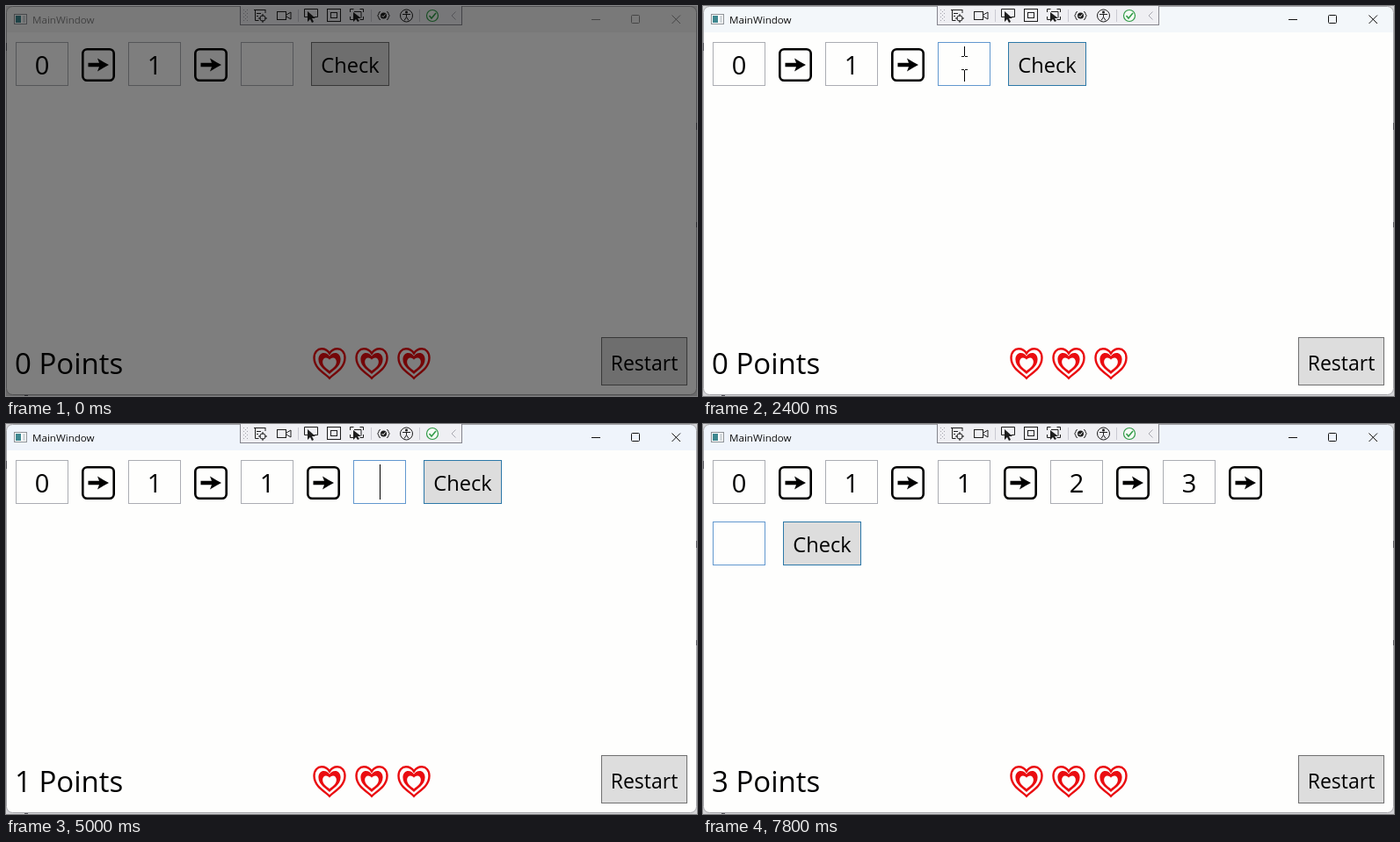
These frames come from a looping animation (786 px wide and 444 px high, 8000 ms). An HTML page:

```html
<!DOCTYPE html>
<html lang="en">
<head>
<meta charset="utf-8">
<title>Number sequence</title>
<style>
  html, body { margin: 0; width: 100%; height: 100%; overflow: hidden; background: #fefefd; }
  svg { display: block; width: 786px; height: 444px; font-family: "Open Sans", "Noto Sans", sans-serif; isolation: isolate; }
  text { fill: #000; }
  .mid { text-anchor: middle; }
  .line { fill: none; stroke: #1e1e1e; }
  .box { fill: #fefefd; stroke: #abadb3; }
  .focus { stroke: #6298cf; }
  .button { fill: #ddd; stroke: #707070; }
  .default { stroke: #2c78a8; }
  .chrome { fill: none; stroke: #8c8c8c; }
  #title { fill: #858585; font-size: 11.6px; }
  #bar { fill: #f3f3f4; }
  .active #bar { fill: #eff4fb; }
  .active #title { fill: #111; }
  .active .chrome { stroke: #111; }
  #ibeam { mix-blend-mode: difference; fill: #fff; }
</style>
</head>
<body>
<svg id="stage" viewBox="0 0 786 444">
  <defs>
    <path id="heartShape" d="M0 16.7C-4 12-17.5 6-17.5-6.5C-17.5-13-13.5-16.7-9-16.7C-5-16.7-2-14.7 0-11.5C2-14.7 5-16.7 9-16.7C13.5-16.7 17.5-13 17.5-6.5C17.5 6 4 12 0 16.7Z"/>
    <g id="heart">
      <use href="#heartShape" fill="#fefefd" stroke="#ea0c10" stroke-width="2.4"/>
      <use href="#heartShape" fill="#ea0c10" transform="scale(.72)"/>
      <use href="#heartShape" fill="#fefefd" transform="translate(0 1) scale(.45)"/>
    </g>
    <g id="arrow">
      <rect x="-17.7" y="-17.7" width="35.4" height="35.4" rx="5" fill="none" stroke="#000" stroke-width="2.6"/>
      <path d="M-11.5-2.2H1L-1-7.5Q6-3 12 0Q6 3-1 7.5L1 2.2H-11.5Z"/>
    </g>
  </defs>

  <rect width="786" height="444" fill="#d3d3d6"/>
  <rect x=".5" y=".5" width="785" height="442" rx="7" fill="#fefefd"/>
  <path id="bar" d="M1 30V8Q1 1 8 1H778Q785 1 785 8V30Z"/>
  <rect x=".5" y=".5" width="785" height="442" rx="7" fill="none" stroke="#a3a3a7"/>
  <path d="M.5 42v9M785.5 133v8M785.5 246v6M21 443.5h4" stroke="#55555c"/>

  <rect x="9.5" y="9.5" width="14" height="11" fill="#fff" stroke="#8d9297"/>
  <path d="M11 11h6v8h-6z" fill="#3f8890"/>
  <path d="M19 11h3v8h-3z" fill="#d4d9dc"/>
  <text id="title" x="30" y="19.7">MainWindow</text>
  <path class="chrome" d="M666 15.5h10M757.5 10.5l9.5 9.5m0-9.5l-9.5 9.5"/>
  <rect class="chrome" x="711.5" y="10.5" width="9" height="9" rx="1"/>

  <g id="tools">
    <rect x="266.5" y="-1" width="252" height="22.5" fill="#efeff3" stroke="#85858d"/>
    <path d="M270.5 4v15M274.5 4v15" stroke="#a5a5ad" stroke-dasharray="1 3"/>
    <path d="M272.5 6v12" stroke="#a5a5ad" stroke-dasharray="1 3"/>
    <path d="M332.5 4v14M415.5 4v14M470.5 4v14" stroke="#cacad2"/>
    <g class="line">
      <path d="M282 4.5h13M283.5 4v12.5h4M295 4v4M285 8.5h5M285 11.5h2" />
      <circle cx="292" cy="14" r="3.2"/>
      <path d="M292 9v3m0 4v3m-5-5h3m4 0h3"/>
      <rect x="308.5" y="6.5" width="10" height="9"/>
      <path d="M319 10l5-3v8l-5-3"/>
      <path d="M343 12.5h-3.5v-9h15v9h-4"/>
      <rect x="365.5" y="3.500" width="15" height="14"/>
      <rect x="369.500" y="7.500" width="7" height="6"/>
      <path d="M391.500 7v-3.500h4m7 0h4V7m0 5v3.500h-4m-7 0h-4V12M396 6.500h8v7"/>
      <path d="M426 6.500q-2 0-2 2t-1.500 2.500q1.500.5 1.500 2.500t2 2M433 6.500q2 0 2 2t1.500 2.500q-1.500.5-1.500 2.500t-2 2"/>
      <circle cx="455.500" cy="11" r="7"/>
      <path d="M451 9.500h9m-4.500 0v3l-2.500 4m2.500-4l2.500 4"/>
    </g>
    <g fill="#1e1e1e">
      <path d="M343 6v12l3-3 2 4 2-1-2-4h4z"/>
      <path d="M395 7v11l3-3 2 3 2-1-2-3h4z"/>
      <circle cx="429.500" cy="11" r="3.500"/>
      <circle cx="455.500" cy="7" r="1.500"/>
    </g>
    <path d="M427.500 11l1.500 1.500 2.500-3" fill="none" stroke="#fff"/>
    <circle cx="485" cy="11" r="6.500" fill="#f5fbf5" stroke="#2f9a46" stroke-width="1.200"/>
    <path d="M481.500 11l2.500 3 5-6" fill="none" stroke="#2f9a46" stroke-width="1.500"/>
    <path d="M511.500 6.500l-4.500 4.500 4.500 4.500" fill="none" stroke="#a9a9b1"/>
  </g>

  <g id="sequence"></g>
  <text id="points" x="10" y="419" font-size="33"></text>
  <use href="#heart" x="368" y="407"/>
  <use href="#heart" x="416" y="407"/>
  <use href="#heart" x="464" y="407"/>
  <rect class="button" x="677.5" y="377.5" width="97" height="54"/>
  <text class="mid" x="726" y="415" font-size="23">Restart</text>

  <rect id="caret" width="1" height="40"/>
  <path id="pointer" d="M0 0V16.500L4 13L6.500 18.500L9 17.500L6.500 12H11.500Z" fill="#fff" stroke="#000"/>
  <path id="ibeam" d="M0-7h1V7h-1zM-3-8h7v1h-7zM-3 7h7v1h-7z"/>
  <rect id="dim" width="786" height="444" fill="#000" opacity=".5"/>
</svg>

<script>
  const LOOP = 8000, STEP = 200;
  const numbers = [0, 1, 1, 2, 3];
  const rounds = [
    { typed: 4600, checked: 4800 },
    { typed: 6000, checked: 6200 },
    { typed: 7000, checked: 7200 }
  ];
  const caretSpans = [[2400, 3000], [3400, 4000], [4600, 5400], [6000, 6800], [7000, 7800]];
  const field = { x: 297, y: 65 };
  const $ = id => document.getElementById(id);
  const show = (id, on) => $(id).setAttribute('display', on ? 'inline' : 'none');
  const move = (id, x, y) => $(id).setAttribute('transform', `translate(${x} ${y})`);
  const slot = i => ({ x: 11 + i % 5 * 128, y: 41 + Math.floor(i / 5) * 70 });

  function numberBox(i, value, focused) {
    const { x, y } = slot(i);
    return `<rect class="box${focused ? ' focus' : ''}" x="${x + .5}" y="${y + .5}" width="59" height="49"/>
      <text class="mid" x="${x + 30}" y="${y + 37}" font-size="29">${value}</text>`;
  }

  function drawSequence(solved, typing, hovered, active) {
    let html = '';
    for (let i = 0; i < solved; i++) {
      const { x, y } = slot(i);
      html += numberBox(i, numbers[i], false) + `<use href="#arrow" x="${x + 94}" y="${y + 26}"/>`;
    }
    const { x, y } = slot(solved);
    html += numberBox(solved, typing ? numbers[solved] : '', hovered || active);
    html += `<rect class="button${active ? ' default' : ''}" x="${x + 80.5}" y="${y + .5}" width="88" height="49"/>
      <text class="mid" x="${x + 124.5}" y="${y + 35}" font-size="23.7">Check</text>`;
    $('sequence').innerHTML = html;
  }

  // The mouse glides to the empty field, clicks, then leaves downwards.
  function drawMouse(t) {
    let x = field.x, y = field.y;
    if (t < 2200) {
      const left = (1 - (t - 1200) / 1000) ** 2;
      x += 411 * left;
      y += 215 * left;
    } else if (t > 2600) {
      const p = ((t - 2600) / 800) ** 1.5;
      x += 40 * p;
      y += 385 * p;
    }
    const visible = t >= 1200 && t < 3400;
    const inField = x > 267 && x < 327 && y > 41 && y < 91;
    show('pointer', visible && !inField);
    show('ibeam', visible && inField);
    move('pointer', x, y);
    move('ibeam', x, y);
    return visible && inField;
  }

  function render(t) {
    const active = t >= 2400;
    const solved = 2 + rounds.filter(r => t >= r.checked).length;
    const typing = rounds.some(r => t >= r.typed && t < r.checked);
    const hovered = drawMouse(t);
    drawSequence(solved, typing, hovered, active);
    $('points').textContent = `${solved - 2} Points`;
    $('stage').classList.toggle('active', active);
    $('bar').style.fill = t === 2400 ? '#f3f7fa' : '';
    const { x, y } = slot(solved);
    move('caret', x + (typing ? 38 : 30), y + 5);
    show('caret', caretSpans.some(([from, to]) => t >= from && t < to));
    show('dim', t < 200);
  }

  let last = -1;
  const start = performance.now();
  function tick(now) {
    const elapsed = Math.max(0, now - start) % LOOP;
    const t = Math.floor(elapsed / STEP) * STEP;
    if (t !== last) render(last = t);
    requestAnimationFrame(tick);
  }
  tick(start);
</script>
</body>
</html>
```
